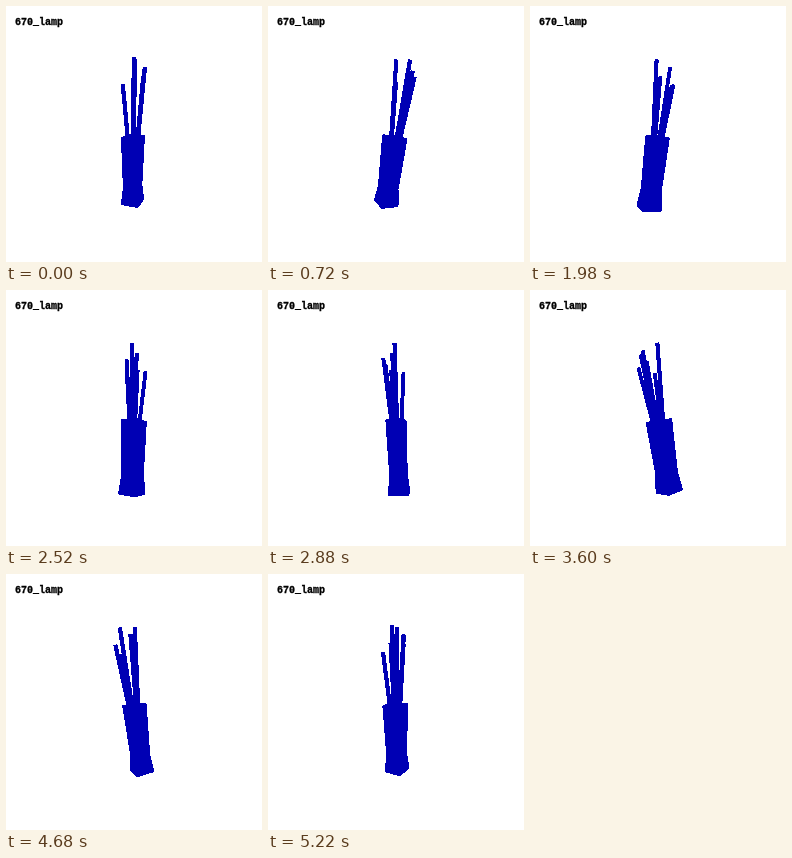
An HTML page with a canvas for the animation above (5.4 s loop, 256 by 256 pixels).

```html
<!DOCTYPE html>
<html lang="en">
<head>
<meta charset="utf-8">
<title>Turntable</title>
<style>
  html, body { margin: 0; width: 100%; height: 100%; overflow: hidden; background: #fff; }
  canvas {
    position: absolute; left: 0; top: 0; width: 256px; height: 256px;
    image-rendering: pixelated;
  }
  .label {
    position: absolute; left: 9px; top: 11px;
    font: bold 10px/12px "Liberation Mono", "Courier New", monospace;
    color: #000; white-space: pre; -webkit-text-stroke: 0.3px #000;
  }
</style>
</head>
<body>
<canvas id="stage" width="256" height="256"></canvas>
<div class="label">670_lamp</div>
<script>
const SIZE = 256;
const ctx = document.getElementById('stage').getContext('2d', { willReadFrequently: true });
const LOOP = 5400, STEPS = 30, HOLD = LOOP / STEPS;
const CENTER_X = 127.7, CENTER_Y = 128.4, DISTANCE = 221, BLUE = '#0000b4';
const RAD = Math.PI / 180;

// Rod tips as [x, y, z]; every rod starts at ROOT inside the vase.
const ROOT = [-1, 60, -10.5];
const TIPS = [
  [-10.5, -48.6, 9.7],
  [10.5, -63.3, 13.5],
  [9.2, -56, 7.4],
  [0.3, -70.8, 18],
  [1.3, -75.3, -0.3],
  [0.4, -53.6, 23.3]
];
const ROD_WIDTH = 4;

// Square cross sections of the tilted vase: [height, corner radius].
const SECTIONS = [[2.5, 12.7], [54, 10.5], [69, 12.6], [71.5, 12.6]];
const TILT = 0.17, YAW = 25;

function ring([y, r]) {
  return [0, 1, 2, 3].map(i => {
    const a = (YAW + 90 * i) * RAD;
    const dx = r * Math.sin(a), dz = r * Math.cos(a);
    return [dx - 0.5 - y * 0.008, y + TILT * dz, dz - 0.6 - y * 0.166];
  });
}
const RINGS = SECTIONS.map(ring);

// Turn around the vertical axis, then apply perspective.
function project([x, y, z], angle) {
  const c = Math.cos(angle), s = Math.sin(angle);
  const k = DISTANCE / (DISTANCE - (z * c - x * s));
  return [CENTER_X + (x * c + z * s) * k, CENTER_Y + y * k, k];
}

function polygon(points) {
  ctx.beginPath();
  points.forEach(p => ctx.lineTo(p[0], p[1]));
  ctx.closePath();
  ctx.fill();
  ctx.lineWidth = 0.6;
  ctx.stroke();
}

function rod(a, b) {
  ctx.lineWidth = ROD_WIDTH * b[2];
  ctx.beginPath();
  ctx.moveTo(a[0], a[1]);
  ctx.lineTo(b[0], b[1]);
  ctx.stroke();
}

// Replace soft edges with hard pixel edges.
function harden() {
  const image = ctx.getImageData(0, 0, SIZE, SIZE), px = image.data;
  const blue = parseInt(BLUE.slice(5), 16);
  for (let i = 0; i < px.length; i += 4) {
    const solid = px[i + 3] > 115;
    px[i] = px[i + 1] = 0;
    px[i + 2] = blue;
    px[i + 3] = solid ? 255 : 0;
  }
  ctx.putImageData(image, 0, 0);
}

function draw(angle) {
  ctx.clearRect(0, 0, SIZE, SIZE);
  ctx.fillStyle = ctx.strokeStyle = BLUE;
  ctx.lineJoin = 'round';
  const root = project(ROOT, angle);
  TIPS.forEach(tip => rod(root, project(tip, angle)));

  const rings = RINGS.map(r => r.map(p => project(p, angle)));
  polygon(rings[0]);
  polygon(rings[rings.length - 1]);
  for (let n = 1; n < rings.length; n++) {
    const top = rings[n - 1], low = rings[n];
    for (let i = 0; i < 4; i++) {
      const j = (i + 1) % 4;
      polygon([top[i], top[j], low[j], low[i]]);
    }
  }
  harden();
}

const start = performance.now();
let shown = -1;
function tick() {
  const t = Math.max(0, performance.now() - start) % LOOP;
  const step = Math.floor(t / HOLD);
  if (step !== shown) draw(step * 360 / STEPS * RAD);
  shown = step;
  requestAnimationFrame(tick);
}
tick();
</script>
</body>
</html>
```
